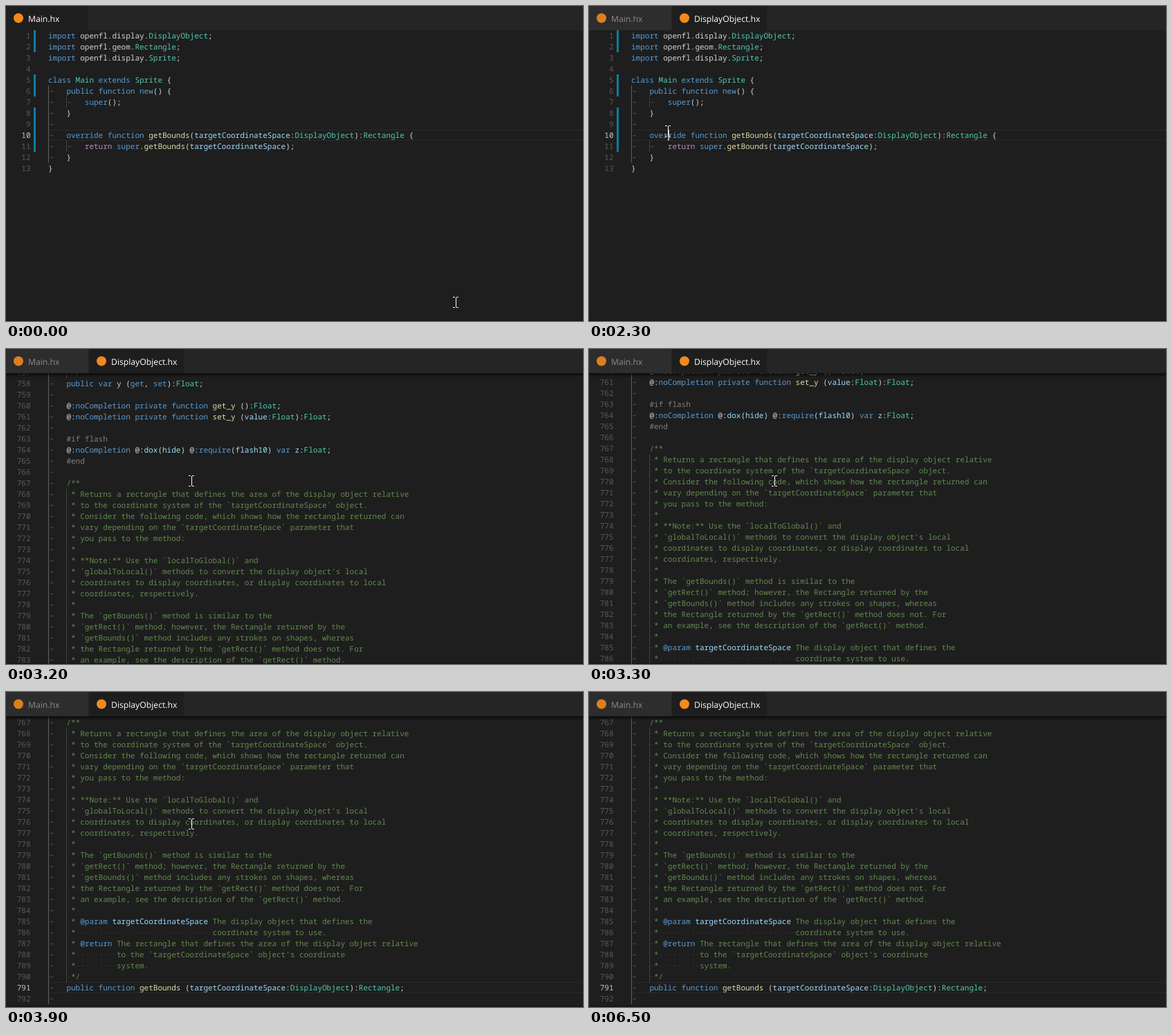
Animation, 834 px wide and 456 px high, one loop 6700 ms. Source, as an HTML page with a canvas:

```html
<!DOCTYPE html>
<html lang="en">
<head>
<meta charset="utf-8">
<title>Go to definition</title>
<style>
  html, body { margin: 0; width: 100%; height: 100%; overflow: hidden; background: #1e1e1e; }
  canvas { display: block; width: 834px; height: 456px; }
</style>
</head>
<body>
<canvas id="stage" width="834" height="456"></canvas>
<script>
const ctx = document.getElementById('stage').getContext('2d');
const W = 834, H = 456, LOOP = 6700;
const CELL = 6.6, ROW = 16, LEFT = 61, TOP = 35;
const CODE_FONT = '11px "Noto Sans Mono", "DejaVu Sans Mono", monospace';
const TAB_FONT = '12.2px "Open Sans", "Noto Sans", sans-serif';
const PLAIN = '#d4d4d4', BLUE = '#569cd6', TEAL = '#4ec9b0', PALE = '#9cdcfe',
      GREEN = '#608b4e', GREY = '#808080', MARK = '#404040';

const wordColors = {};
const colorWords = (color, words) => words.split(' ').forEach(w => wordColors[w] = color);
colorWords(BLUE, 'import class extends public private override function new super var get set noCompletion require');
colorWords('#dcdcaa', 'getBounds get_x set_x get_y set_y');
colorWords('#c586c0', 'return');
colorWords(PALE, 'targetCoordinateSpace value x y z dox hide flash10');

const mainCode = `import openfl.display.DisplayObject;
import openfl.geom.Rectangle;
import openfl.display.Sprite;

class Main extends Sprite {
\tpublic function new() {
\t\tsuper();
\t}
\t
\toverride function getBounds(targetCoordinateSpace:DisplayObject):Rectangle {
\t\treturn super.getBounds(targetCoordinateSpace);
\t}
}`.split('\n');

const pad = n => ' '.repeat(n);
const objectCode = `@:noCompletion private function get_x ():Float;
@:noCompletion private function set_x (value:Float):Float;

/**
 * Indicates the _y_ coordinate of the DisplayObject instance relative to
 * the local coordinates of the parent DisplayObjectContainer. If the
 * object is inside a DisplayObjectContainer that has 90° rotation, it is
 * in the local coordinate system of the enclosing
 * DisplayObjectContainer. Thus, for a DisplayObjectContainer rotated 90°
 * counterclockwise, the DisplayObjectContainer's children inherit a
 * coordinate system that is rotated 90° counterclockwise. The object's
 * coordinates refer to the registration point position.
 */
public var y (get, set):Float;

@:noCompletion private function get_y ():Float;
@:noCompletion private function set_y (value:Float):Float;

#if flash
@:noCompletion @:dox(hide) @:require(flash10) var z:Float;
#end

/**
 * Returns a rectangle that defines the area of the display object relative
 * to the coordinate system of the \`targetCoordinateSpace\` object.
 * Consider the following code, which shows how the rectangle returned can
 * vary depending on the \`targetCoordinateSpace\` parameter that
 * you pass to the method:
 *
 * **Note:** Use the \`localToGlobal()\` and
 * \`globalToLocal()\` methods to convert the display object's local
 * coordinates to display coordinates, or display coordinates to local
 * coordinates, respectively.
 *
 * The \`getBounds()\` method is similar to the
 * \`getRect()\` method; however, the Rectangle returned by the
 * \`getBounds()\` method includes any strokes on shapes, whereas
 * the Rectangle returned by the \`getRect()\` method does not. For
 * an example, see the description of the \`getRect()\` method.
 *${pad(1)}
 * @param targetCoordinateSpace The display object that defines the
 *${pad(30)}coordinate system to use.
 * @return The rectangle that defines the area of the display object relative
 *${pad(9)}to the \`targetCoordinateSpace\` object's coordinate
 *${pad(9)}system.
 */
public function getBounds (targetCoordinateSpace:DisplayObject):Rectangle;
`.split('\n').map(line => '\t' + line);

const mainFile = { lines: mainCode, first: 1, active: 10 };
const objectFile = { lines: objectCode, first: 745, active: 791 };

const mousePath = [
  [0, 650, 429], [300, 480, 392], [700, 196, 327], [900, 138, 235], [1100, 114, 179],
  [1500, 114, 179], [1600, 114, 185], [1800, 114, 185], [1900, 114, 181], [2300, 114, 181],
  [2400, 268, 191], [4300, 268, 191], [4600, 390, 255], [4900, 486, 321], [5000, 446, 361],
  [5300, 270, 405], [5700, 142, 449], [5800, 142, 480], [LOOP, 142, 480]
];

function rect(x, y, w, h, color) {
  ctx.fillStyle = color;
  ctx.fillRect(x, y, w, h);
}

function text(str, x, y, color, font = CODE_FONT, align = 'left') {
  ctx.font = font;
  ctx.textAlign = align;
  ctx.fillStyle = color;
  ctx.fillText(str, x, y);
}

function codeTokens(body) {
  if (body[0] === '#') return [[body, GREY]];
  return (body.match(/\w+|\s+|[^\w\s]+/g) || []).map(word =>
    [word, wordColors[word] || (/^[A-Z]/.test(word) ? TEAL : PLAIN)]);
}

function commentTokens(body) {
  return body.split(/(@\w+(?: targetCoordinateSpace)?)/).flatMap(part => {
    if (part[0] !== '@') return [[part, GREEN]];
    const [tag, name] = part.split(/(?= )/);
    return name ? [[tag, BLUE], [name, PALE]] : [[tag, BLUE]];
  });
}

function drawArrow(x, y) {
  rect(x + 2, y + 8, 5, 1, MARK);
  rect(x + 5, y + 7, 1, 3, MARK);
}

function drawLine(line, y) {
  const tabs = line.match(/^\t*/)[0].length;
  const body = line.slice(tabs);
  const isComment = /^(\/\*| \*)/.test(body);
  const guides = tabs + (body[0] === ' ' ? 1 : 0);
  let col = tabs * 4;

  for (let i = 0; i < guides; i++)
    rect(Math.round(LEFT + i * 4 * CELL), y, 1, ROW, i ? MARK : '#606060');
  for (let i = 0; i < tabs; i++) drawArrow(Math.round(LEFT + i * 4 * CELL), y);
  for (const run of body.matchAll(/^ | {2,}| $/g))
    for (let i = 0; i < run[0].length; i++)
      rect(Math.round(LEFT + (col + run.index + i) * CELL + 3), y + 8, 1, 1, '#4a4a4a');

  for (const [word, color] of isComment ? commentTokens(body) : codeTokens(body)) {
    const lead = word.length - word.trimStart().length;
    text(word.trimStart(), LEFT + (col + lead) * CELL, y + 12, color);
    col += word.length;
  }
}

function drawFile(file, top, numbers) {
  file.lines.forEach((line, i) => {
    const n = file.first + i, y = top + i * ROW, active = n === file.active;
    if (y < TOP - ROW || y > H) return;
    if (active) {
      rect(LEFT, y, W - LEFT, 1, '#292929');
      rect(LEFT, y + ROW - 1, W - LEFT, 1, '#292929');
    }
    if (numbers) text(n, 35.5, y + 12, active ? '#c6c6c6' : '#5a5a5a', CODE_FONT, 'right');
    drawLine(line, y);
  });
}

function drawTab(x, w, label, active) {
  rect(x, 0, w, TOP, active ? '#1e1e1e' : '#2d2d2d');
  ctx.globalAlpha = active ? 1 : 0.9;
  ctx.fillStyle = '#f08a1d';
  ctx.beginPath();
  ctx.arc(x + 18, 17.5, 7, 0, Math.PI * 2);
  ctx.fill();
  ctx.globalAlpha = 1;
  text(label, x + 32, 23, active ? '#ffffff' : '#8b8b8b', TAB_FONT);
}

function drawBeam(x, y) {
  rect(x, y - 7, 1, 14, '#ffffff');
  for (const end of [-8, 7]) {
    rect(x - 4, y + end, 3, 1, '#ffffff');
    rect(x + 1, y + end, 3, 1, '#ffffff');
  }
}

function drawHand(x, y) {
  ctx.save();
  ctx.translate(x - 6, y);
  ctx.fillStyle = '#ffffff';
  ctx.strokeStyle = '#000000';
  ctx.lineWidth = 1;
  ctx.stroke(new Path2D('M5.5 13V2Q7 -.5 8.5 2V7Q10.500 5.500 11.500 8Q13.500 6.500 14.500 9Q17 8 17 11V15L15 21.500H7.500L1 13.500Q1.500 10.500 5.500 13Z'));
  ctx.fill(new Path2D('M5.5 13V2Q7 -.5 8.5 2V7Q10.500 5.500 11.500 8Q13.500 6.500 14.500 9Q17 8 17 11V15L15 21.500H7.500L1 13.500Q1.500 10.500 5.500 13Z'));
  ctx.restore();
}

function mouseAt(t) {
  const i = mousePath.findIndex(p => p[0] > t);
  const [t0, x0, y0] = mousePath[i - 1], [t1, x1, y1] = mousePath[i];
  const k = (t - t0) / (t1 - t0);
  return [Math.round(x0 + (x1 - x0) * k), Math.round(y0 + (y1 - y0) * k)];
}

const within = (t, from, to) => t >= from && t < to;

function drawMainView(t) {
  drawFile(mainFile, TOP, true);
  for (const [from, to] of [[1, 2], [5, 6], [8, 11]])
    rect(40, TOP + (from - 1) * ROW, 3, (to - from + 1) * ROW, '#0c7d9d');
  if (within(t, 1500, 1900)) rect(87, 191, 53, 1, BLUE);
  if (t >= 1900) rect(114, 179, 2, ROW, '#aeafad');
}

function drawObjectView(t) {
  const wheelSteps = [2900, 3000, 3100, 3200, 3300, 3500, 3900].filter(s => t >= s).length;
  const top = 34 - wheelSteps * 50;
  drawFile(objectFile, top, t >= 2600);
  if (within(t, 4400, 4900) || within(t, 5400, 5900) || within(t, 6400, 6500))
    rect(193, top + (objectFile.active - objectFile.first) * ROW, 2, ROW, '#aeafad');
  const shadow = ctx.createLinearGradient(0, TOP, 0, TOP + 6);
  shadow.addColorStop(0, 'rgba(0,0,0,.65)');
  shadow.addColorStop(1, 'rgba(0,0,0,0)');
  rect(0, TOP, W, 6, shadow);
}

function draw(t) {
  const opened = t >= 2200;
  rect(0, 0, W, H, '#1e1e1e');
  (t < 2400 ? drawMainView : drawObjectView)(t);
  rect(0, 454, W, 2, 'rgba(0,0,0,.2)');

  rect(0, 0, W, TOP, '#252526');
  drawTab(0, opened ? 119 : 118, 'Main.hx', !opened);
  if (opened) drawTab(120, 137, 'DisplayObject.hx', true);

  (within(t, 1600, 1900) ? drawHand : drawBeam)(...mouseAt(t));
}

function tick() {
  draw(Math.floor(performance.now() % LOOP / 100) * 100);
  requestAnimationFrame(tick);
}

ctx.textRendering = 'geometricPrecision';
tick();
</script>
</body>
</html>
```
